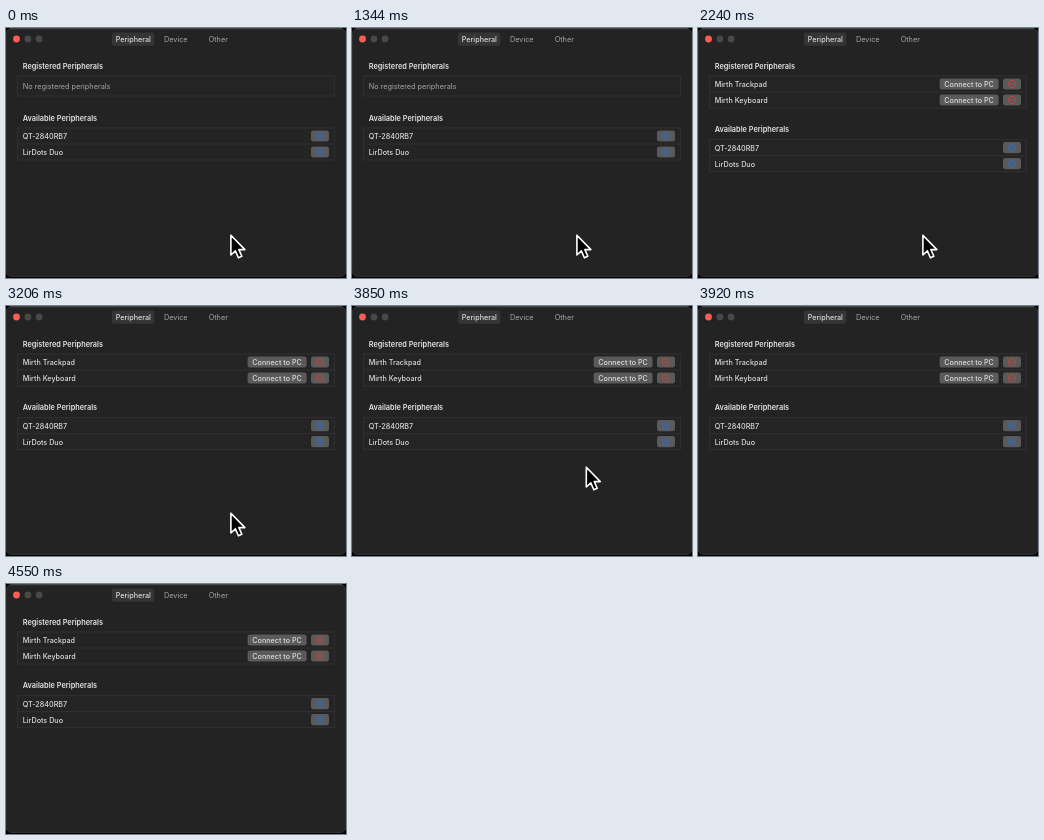
Write an HTML page that moves like this. It is 340 px wide and 250 px high and loops after 4970 ms.

```html
<!DOCTYPE html>
<html lang="en">
<head>
<meta charset="utf-8">
<title>Peripherals</title>
<style>
  html, body { margin: 0; width: 100%; height: 100%; overflow: hidden; background: #000; }
  svg { display: block; width: 100vw; height: 100vh; }
  text { font: 500 7.2px Inter, sans-serif; fill: #dedede; }
  .head { font-weight: 600; font-size: 7.35px; fill: #e4e4e4; }
  .dim { font-weight: 400; font-size: 7.3px; fill: #a6a6a6; }
  .box { fill: #242424; stroke: #343434; stroke-width: .8; }
  .btn { fill: #5a5a5a; }
  .mid { text-anchor: middle; }
</style>
</head>
<body>
<svg id="stage" viewBox="0 0 340 250" xmlns="http://www.w3.org/2000/svg">
  <rect x=".3" y=".6" width="339.4" height="247.9" rx="5" fill="#232323" stroke="#444" stroke-width=".6"/>
  <path d="M4 .7H336" stroke="#555" stroke-width=".8"/>
  <circle cx="10.5" cy="11" r="3.4" fill="#fb5e56"/>
  <circle cx="21.9" cy="11" r="3.4" fill="#484848"/>
  <circle cx="33.1" cy="11" r="3.4" fill="#484848"/>
  <rect x="106" y="4.5" width="42.3" height="13.2" rx="2.5" fill="#353535"/>
  <text class="mid" x="127.3" y="13.6">Peripheral</text>
  <text class="mid dim" x="169.8" y="13.6">Device</text>
  <text class="mid dim" x="212.3" y="13.6">Other</text>
  <text class="head" x="16.7" y="40.6">Registered Peripherals</text>
  <g id="empty"></g>
  <g id="paired"></g>
  <g id="found"></g>
  <path id="cursor" d="M0 0V19.8L4.5 15.7L7.5 22.6L10.9 21.1L8 14.4H14Z" fill="#000" stroke="#fff" stroke-width="1.6" stroke-linejoin="round"/>
</svg>
<script>
const LOOP = 4970, PAIR = 2240, MOVE = 3850, HIDE = 3920;
const RED = '#c9443f', BLUE = '#2f70c4';
const $ = id => document.getElementById(id);

const box = (y, h) => `<rect class="box" x="11.5" y="${y}" width="316.8" height="${h}"/>`;
const label = (s, y, cls = '') => `<text class="${cls}" x="16.7" y="${y}">${s}</text>`;
const button = (x, y, w) => `<rect class="btn" x="${x}" y="${y}" width="${w}" height="11.2" rx="2.4"/>`;

function icon(y, color, plus) {
  const bars = 'M312.2 0h3.6' + (plus ? 'M314 -1.8v3.6' : '');
  return button(305, y - 5.6, 18) +
    `<g transform="translate(0 ${y})" fill="none" stroke="${color}" stroke-width=".9">
      <circle cx="314" cy="0" r="3.6"/><path d="${bars}"/></g>`;
}

function list(y, names, color, paired) {
  let out = box(y, 32) + `<path d="M11.5 ${y + 16}h316.8" stroke="#343434" stroke-width=".8"/>`;
  names.forEach((name, i) => {
    const mid = y + 8 + i * 16;
    out += label(name, mid + 2.9) + icon(mid, color, !paired);
    if (paired) out += button(241.6, mid - 5.6, 59) +
      `<text class="mid" x="271.1" y="${mid + 2.7}">Connect to PC</text>`;
  });
  return out;
}

$('empty').innerHTML = box(48, 20) + label('No registered peripherals', 60.8, 'dim');
$('paired').innerHTML = list(48, ['Mirth Trackpad', 'Mirth Keyboard'], RED, true);
$('found').innerHTML = label('Available Peripherals', 92.8, 'head') +
  list(100, ['QT-2840RB7', 'LirDots Duo'], BLUE, false);

const show = (id, on) => $(id).setAttribute('visibility', on ? 'visible' : 'hidden');

function draw(t) {
  const paired = t >= PAIR;
  show('empty', !paired);
  show('paired', paired);
  $('found').setAttribute('transform', `translate(0 ${paired ? 11.7 : 0})`);
  show('cursor', t < HIDE);
  $('cursor').setAttribute('transform', t < MOVE ? 'translate(224.9 207.2)' : 'translate(234.3 161.2)');
}

const start = performance.now();
function tick() {
  draw((performance.now() - start) % LOOP);
  requestAnimationFrame(tick);
}
tick();
</script>
</body>
</html>
```
